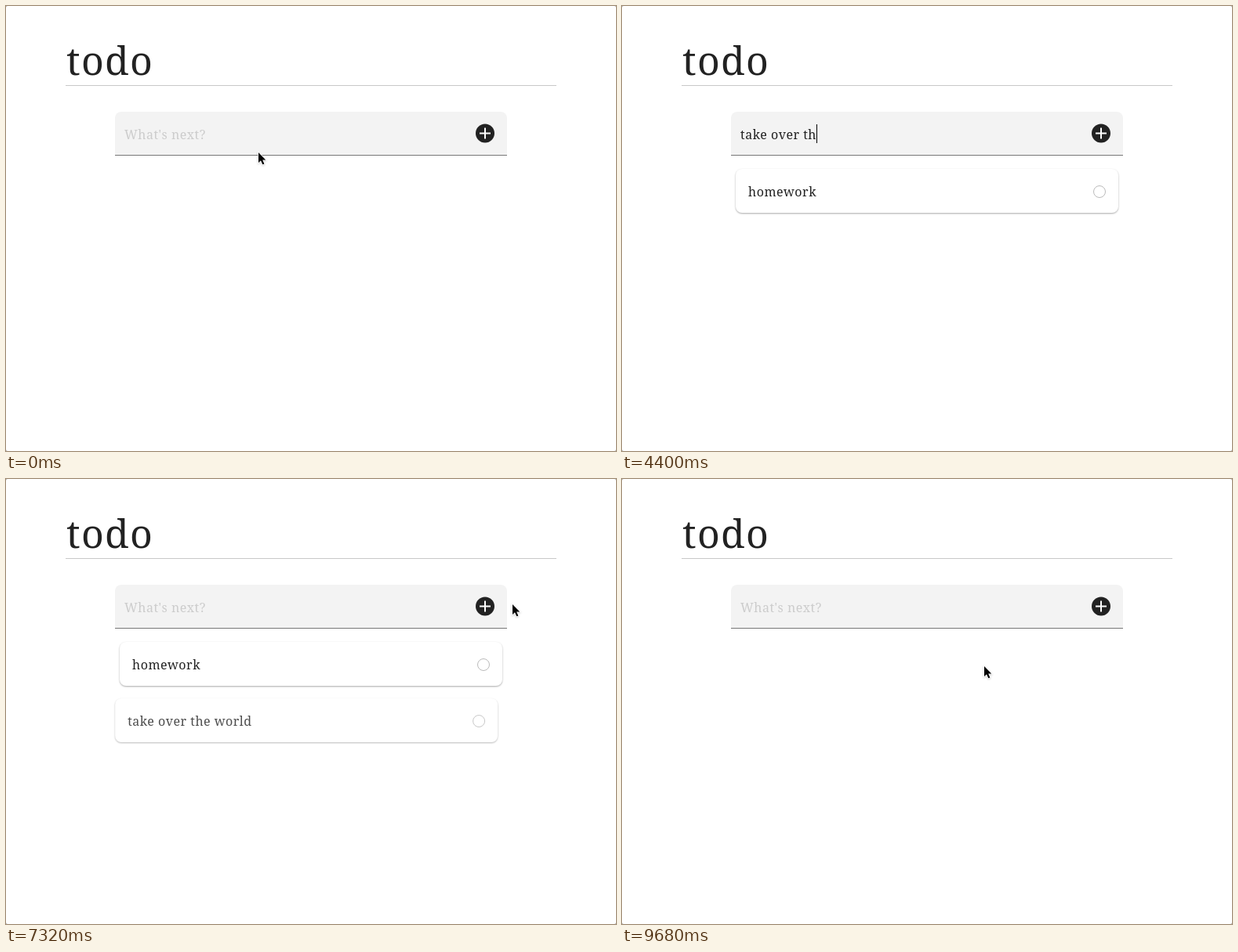
Recreate the animation shown at these times as an HTML page. Size 778 by 568 pixels, loop 9.84 s.

```html
<!DOCTYPE html>
<html lang="en">
<head>
<meta charset="utf-8">
<title>todo</title>
<style>
  html, body { margin: 0; width: 100%; height: 100%; overflow: hidden; background: #999; }
  .stage {
    position: relative; width: 778px; height: 568px; overflow: hidden;
    background: #fff; border-radius: 2px; color: #222;
    font: 16px "Noto Serif", serif; letter-spacing: .5px;
  }
  .stage * { box-sizing: border-box; }
  h1, .rule, .field, .field > *, .item, .item > *, .cursor, .cursor svg { position: absolute; }

  h1 { left: 77px; top: 39px; margin: 0; font-size: 50px; font-weight: 400; line-height: 60px; letter-spacing: 1.3px; }
  .rule { left: 76px; top: 101px; width: 626px; height: 1px; background: #c8c8c8; }

  .field {
    left: 139px; top: 135px; width: 500px; height: 56px;
    background: #f3f3f3; border-bottom: 1px solid #777; border-radius: 8px 8px 0 0;
    line-height: 58px; white-space: pre;
  }
  .field > * { left: 12px; top: 0; }
  .hint { color: #ccc; }
  .entry { display: flex; }
  .caret { width: 1px; height: 24px; margin-top: 16px; background: #000; animation: caret 9.84s step-end infinite; }
  .field .add { left: 460px; top: 15px; }

  .item {
    left: 145px; width: 488px; height: 56px; border-radius: 8px; background: #fff;
    box-shadow: 0 1px 3px rgba(0,0,0,.12), 0 1px 2px rgba(0,0,0,.24);
    line-height: 59px; white-space: pre;
  }
  .item span { left: 16px; top: 0; }
  .item i { left: 456px; top: 21px; width: 16px; height: 16px; border: 1px solid #bbb; border-radius: 50%; }
  .item.done { background: none; box-shadow: none; color: #999; }
  .item.done span { text-decoration: line-through; }
  .item.done i { border: 5.5px solid #222; background: #fff; }
  #first { top: 208px; animation: first 9.84s ease infinite; }
  #second { top: 280px; animation: second 9.84s ease infinite; }

  .cursor { left: 0; top: 0; animation: move 9.84s linear infinite; }
  .cursor svg { overflow: visible; width: 1px; height: 1px; left: 0; top: 0; }
  .cursor .arrow { left: .7px; top: -.7px; animation: arrow 9.84s step-end infinite; filter: drop-shadow(0 1px 1px rgba(0,0,0,.2)); }
  .cursor .beam { left: .5px; animation: beam 9.84s step-end infinite; }

  @keyframes caret {
    0% { opacity: 0 } 6.9% { opacity: 1 } 61.4% { opacity: 0 }
    66.7% { opacity: 1 } 71.95%, 100% { opacity: 0 }
  }
  @keyframes first {
    0%, 21.85% { opacity: 0; transform: translateX(-30px) }
    26.93%, 92.99% { opacity: 1; transform: translateX(0) }
    98.07%, 100% { opacity: 0; transform: translateX(30px) }
  }
  @keyframes second {
    0%, 71.85% { opacity: 0; transform: translateX(-30px) }
    76.93%, 83.28% { opacity: 1; transform: translateX(0) }
    88.36%, 100% { opacity: 0; transform: translateX(30px) }
  }
  @keyframes arrow { 0% { opacity: 1 } .8% { opacity: 0 } 69.2%, 100% { opacity: 1 } }
  @keyframes beam {
    0% { opacity: 0 } .8% { opacity: 1 } 7.7% { opacity: 0 }
    60.1% { opacity: 1 } 69.2%, 100% { opacity: 0 }
  }
  @keyframes move {
    0%, .4% { transform: translate(321px, 188px) }
    2.03%, 60.1% { transform: translate(316px, 180px) }
    61.7%, 62.2% { transform: translate(327px, 178px) }
    64% { transform: translate(360px, 184px) }
    67% { transform: translate(490px, 182px) }
    69.5% { transform: translate(612px, 166px) }
    71.9% { transform: translate(613px, 165px) }
    74.39%, 74.7% { transform: translate(645px, 161px) }
    75.6% { transform: translate(672px, 143px) }
    76.8% { transform: translate(675px, 195px) }
    78.5% { transform: translate(640px, 285px) }
    80.1% { transform: translate(610px, 306px) }
    83.3% { transform: translate(609px, 307px) }
    84.96%, 85.3% { transform: translate(593px, 246px) }
    88% { transform: translate(605px, 237px) }
    93% { transform: translate(606px, 236px) }
    98.37%, 100% { transform: translate(461px, 240px) }
  }
</style>
</head>
<body>
<div class="stage">
  <h1>todo</h1>
  <div class="rule"></div>
  <div class="field">
    <span class="hint" id="hint">What's next?</span>
    <div class="entry"><span id="typed"></span><span class="caret"></span></div>
    <svg class="add" width="24" height="25">
      <circle cx="12" cy="12.5" r="12" fill="#222"/>
      <path d="M5 12.5H19M12 5.5V19.5" stroke="#fff" stroke-width="2"/>
    </svg>
  </div>
  <div class="item" id="first"><span>homework</span><i></i></div>
  <div class="item" id="second"><span>take over the world</span><i></i></div>
  <div class="cursor">
    <svg class="arrow">
      <path d="M0 0V13L3 10.2 5.3 15.3 7.4 14.4 5.2 9.4H9.3Z" stroke="#fff" stroke-width="1.6" paint-order="stroke"/>
    </svg>
    <svg class="beam" fill="none">
      <path d="M-3.5 -8Q0 -8 0 -5.5Q0 -8 3.5 -8M0 -6V6M-3.5 8Q0 8 0 5.5Q0 8 3.5 8M-2 3H2" stroke="#000"/>
    </svg>
  </div>
</div>
<script>
  const LOOP = 9840;
  const $ = id => document.getElementById(id);

  // Each entry: its text, the time of every key press, and when it is added.
  const entries = [
    { text: "homework", keys: [760, 960, 1040, 1200, 1400, 1520, 1720, 1840], sent: 2180 },
    { text: "take over the world",
      keys: [2680, 2800, 2960, 3160, 3320, 3520, 3640, 3800, 3960, 4160,
             4280, 4400, 4480, 4600, 4880, 5200, 5320, 5520, 5680], sent: 7080 }
  ];
  const doneAt = { first: 9150, second: 8195 };

  function typedAt(t) {
    const entry = entries.find(e => t < e.sent);
    return entry ? entry.text.slice(0, entry.keys.filter(k => k <= t).length) : "";
  }

  let start;
  function draw(now) {
    start ??= now;
    const t = (now - start) % LOOP;
    const text = typedAt(t);
    $("typed").textContent = text;
    $("hint").style.visibility = text ? "hidden" : "visible";
    for (const id in doneAt) $(id).classList.toggle("done", t >= doneAt[id]);
    requestAnimationFrame(draw);
  }
  requestAnimationFrame(draw);
</script>
</body>
</html>
```
